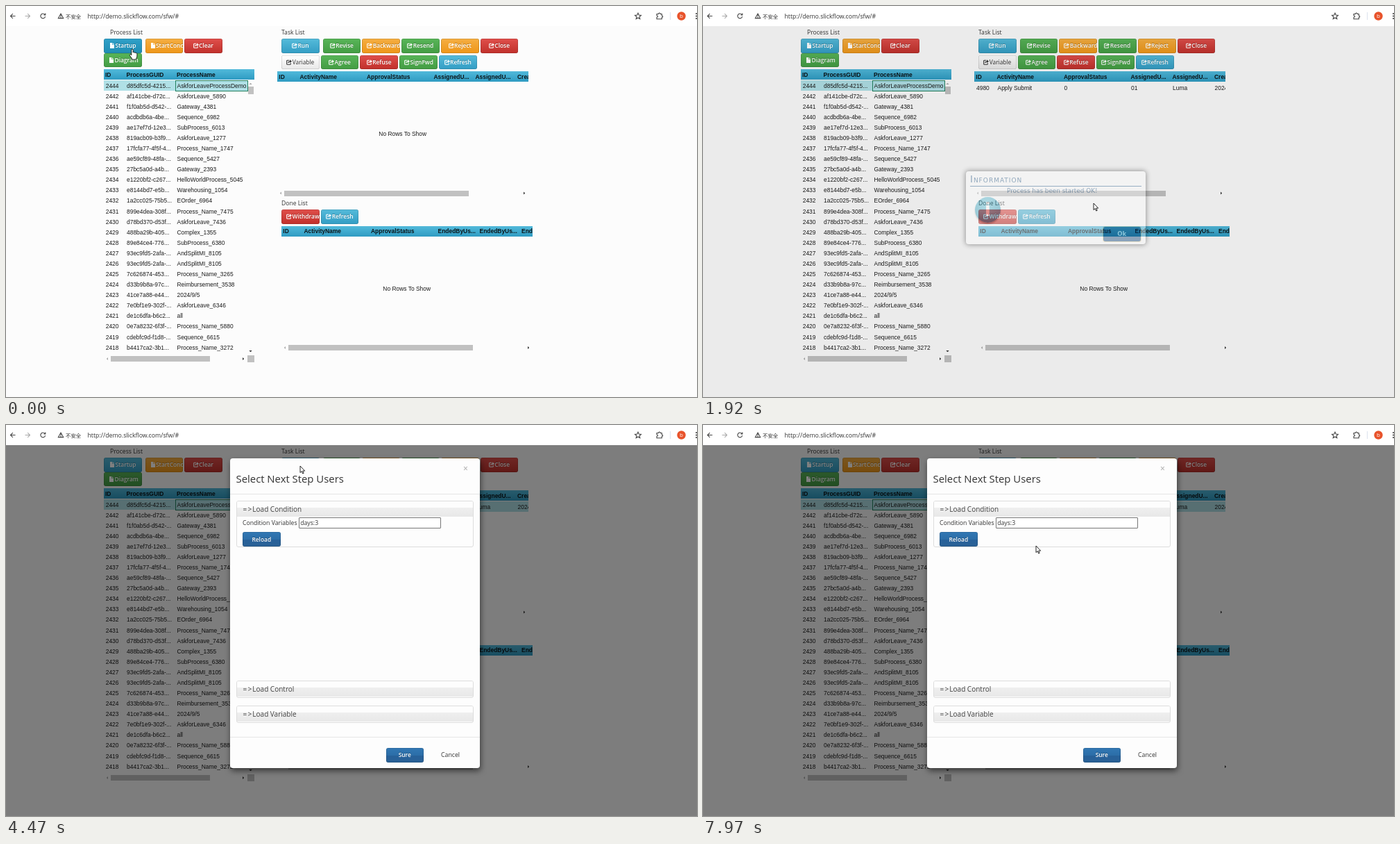
An HTML page that plays this animation: 996x563 px, repeating every 8000 ms.

```html
<!DOCTYPE html>
<html lang="en">
<head>
<meta charset="utf-8">
<title>Process demo</title>
<style>
html, body { margin: 0; width: 100%; height: 100%; overflow: hidden; background: #fcfcfc; }
#stage { position: absolute; left: 0; top: 0; width: 996px; height: 563px; overflow: hidden; background: #fcfcfc; }
#stage div { position: absolute; box-sizing: border-box; }
#stage svg { position: absolute; overflow: visible; }
.t { line-height: 12px; white-space: pre; font: 8.45px/12px "Liberation Sans", Arial, sans-serif; color: #1c1c1c; }
.ui { font: 8.65px/12px "Open Sans", sans-serif; color: #333; }
.bar { background: #fff; }
.head { background: linear-gradient(#52b9da, #41acd0 45%, #2f9bc2); overflow: hidden; }
.head .t { font-weight: bold; color: #0b1418; }
.row { overflow: hidden; }
.sel { background: #b0e0e6; }
.focus { border: 1px solid #22805e; }
.thumb { background: #c1c1c1; }
.tint { background: rgba(0, 0, 0, .03); visibility: hidden; }
.stripe { background: rgba(255, 255, 255, .3); visibility: hidden; }
.pill { background: #fff; border-radius: 4px; opacity: .6; visibility: hidden; }
.lit .tint, .lit .stripe, .lit .pill { visibility: visible; }
.btn { display: flex; align-items: center; justify-content: safe center; padding: 0 7px; overflow: hidden;
  border-radius: 3px; color: #fff; font: 600 8.4px/20px "Open Sans", sans-serif; white-space: pre;
  box-shadow: inset 0 0 0 .6px rgba(0, 0, 0, .2); text-shadow: 0 -.6px 0 rgba(0, 0, 0, .25); }
#stage .btn svg { position: static; flex: none; width: 8px; height: 8px; margin-right: .5px; }
.info { background: linear-gradient(#55bbda, #339dc4); }
.info.hover { background: linear-gradient(#2fa0c8, #1f8db4); }
.ok { background: linear-gradient(#58b558, #439c43); }
.warn { background: linear-gradient(#f5ae42, #ee9618); }
.bad { background: linear-gradient(#e04f4b, #c0302b); }
.plain { background: linear-gradient(#fff, #e8e8e8); color: #333; font-weight: 400; text-shadow: none; }
.main { background: linear-gradient(#3278b4, #2c6ea8 50%, #27619a 51%, #2a6196); }
#backdrop, #veil { left: 0; top: 29px; width: 996px; height: 534px; background: #000; }
#backdrop { opacity: .5; }
#modal { left: 322.5px; top: 48px; width: 360px; height: 446px; background: #fdfdfd; border-radius: 4px;
  box-shadow: 1px 4px 8px rgba(0, 0, 0, .55); }
.rule { background: #e6e6e6; }
.panel { border: 1px solid #ddd; border-radius: 3px; overflow: hidden; }
.cap { background: linear-gradient(#fdfdfd 9px, #efefef 9px, #e8e8e8); }
.field { border: 1px solid #777; background: #fff; border-radius: 1px; }
#msg { left: 379px; width: 259px; height: 105px; background: #fff; border-radius: 4px; box-shadow: 0 0 7px 1px #222; }
.title { font: small-caps 13.2px/16px "DejaVu Sans", sans-serif; letter-spacing: 1px; color: #0a4478; }
.line { background: #1c5488; }
.text { font: 8.85px/12px "DejaVu Sans", sans-serif; color: #1b4f80; white-space: pre; }
.badge { border-radius: 50%; color: #fff; text-align: center; font: bold 27px/36px "DejaVu Sans", sans-serif;
  background: radial-gradient(circle at 45% 25%, #5cc6dc, #138cb0 75%); box-shadow: 0 2px 2px rgba(0, 0, 0, .35); }
.alert .badge { background: radial-gradient(circle at 45% 25%, #ffc043, #f08c08 75%); }
.go { background: #013d74; border-radius: 3px; color: #fff; text-align: center; font: bold 8.6px/21px "DejaVu Sans", sans-serif;
  box-shadow: 0 0 0 1px rgba(230, 190, 90, .6); }
.alert .go { box-shadow: 0 0 1px #234; }
</style>
</head>
<body>
<div id="stage">
  <div id="page"></div>
  <div id="backdrop"></div>
  <div id="veil"></div>
  <div id="modal"></div>
  <div id="msg"></div>
  <svg id="cursor" width="1" height="1"><path stroke="#111" stroke-width=".9" stroke-linejoin="round"/></svg>
</div>
<script>
const $ = id => document.getElementById(id);
const page = $("page"), modal = $("modal"), msg = $("msg"), cursor = $("cursor");

function box(parent, cls, x, y, w, h, html = "") {
  const e = document.createElement("div");
  e.className = cls;
  e.style.cssText = `left:${x}px;top:${y}px;` + (w ? `width:${w}px;height:${h}px` : "");
  e.innerHTML = html;
  parent.append(e);
  return e;
}
// Text placed by its left edge and the middle of its line
const label = (parent, x, mid, text, cls = "t", size = 0) => {
  const e = box(parent, cls, x, mid - 6, 0, 0, text);
  if (size) e.style.fontSize = size + "px";
  return e;
};
const ui = (parent, x, mid, text, size) => label(parent, x, mid, text, "t ui", size);
const svg = (parent, content) => parent.insertAdjacentHTML("beforeend",
  `<svg width="996" height="563" style="left:0;top:0" fill="none">${content}</svg>`);

const fileIcon = `<svg viewBox="0 0 8 8" fill="currentColor"><path d="M1 0h3v2.8h3V8H1zM4.7 0L7 2.2H4.7z"/></svg>`;
const shareIcon = `<svg viewBox="0 0 8 8" fill="none" stroke="currentColor" stroke-width="1.1">
  <path d="M4 1.2H1.6Q.7 1.2.7 2.1V6.4Q.7 7.3 1.6 7.3H5.4Q6.3 7.3 6.3 6.4V5.2M2.9 5Q2.9 2.7 5.4 2.7"/>
  <path d="M5 .3L8 2.7L5 5z" fill="currentColor" stroke="none"/></svg>`;
const button = (x, y, kind, text, icon = shareIcon) => box(page, "btn " + kind, x, y, 54.5, 20.5, icon + text);

// Browser bar
box(page, "bar", 0, 0, 996, 29);
ui(page, 86, 14.5, "不安全", 7.4).style.fontFamily = '"Noto Sans CJK SC", "Noto Sans CJK", sans-serif';
ui(page, 117.5, 14.5, "http://demo.slickflow.com/sfw/#", 8.75);
svg(page, `<g stroke="#444" stroke-width="1.1">
  <path d="M13.5 14.5H6.6M9.8 11.2L6.5 14.5L9.8 17.8"/>
  <path stroke="#aaa" d="M27.5 14.5H34.4M31.2 11.2L34.5 14.5L31.2 17.8"/>
  <path d="M56 12.4A3.4 3.4 0 1 0 56.6 15.2M56.8 10.6V13H54.4"/>
  <path d="M79 11L82.7 17.6H75.3ZM79 13.3V15.4M79 16V16.9"/>
  <path d="M911 10.2L912.3 13.1L915.4 13.4L913.1 15.5L913.8 18.6L911 17L908.2 18.6L908.9 15.5L906.6 13.4L909.7 13.1Z"/>
  <path d="M938 11.5H940.5Q940.5 10 941.8 10T943 11.5H945.3V14Q946.7 14 946.7 15.2T945.3 16.4V18.7H938V16.3Q939.5 16.2 939.5 15T938 13.8Z"/>
  <path stroke="#dde3ee" d="M957.5 9V20"/></g>
  <circle cx="973.5" cy="14.5" r="6.2" fill="#e8532b"/>
  <g fill="#333"><circle cx="995" cy="11" r="1"/><circle cx="995" cy="14.5" r="1"/><circle cx="995" cy="18" r="1"/></g>`);
ui(page, 971, 14.3, "b", 8).style.color = "#fff";

// Buttons
ui(page, 150, 38, "Process List");
ui(page, 397, 38, "Task List");
ui(page, 397, 284, "Done List");
const startup = button(141, 47, "info", "Startup", fileIcon);
button(200.5, 47, "warn", "StartCond", fileIcon);
button(257, 47, "bad", "Clear");
button(141, 67.5, "ok", "Diagram", fileIcon);
const run = button(397, 47, "info", "Run");
button(456.5, 47, "ok", "Revise");
button(513.3, 47, "warn", "Backward");
button(570, 47, "ok", "Resend");
button(627, 47, "warn", "Reject");
button(683.7, 47, "bad", "Close");
button(397, 70.5, "plain", "Variable");
button(453.7, 70.5, "ok", "Agree");
button(510.4, 70.5, "bad", "Refuse");
button(567, 70.5, "ok", "SignFwd");
button(624, 70.5, "info", "Refresh");
button(397, 293, "bad", "Withdraw");
button(453.6, 293, "info", "Refresh");

// Grids
function cells(cls, x, y, w, xs, texts) {
  const row = box(page, cls, x, y, w, 15);
  texts.forEach((text, i) => label(row, xs[i], 7.6, text));
  return row;
}
function scrollbar(x, y, len, end) {
  box(page, "thumb", x + 5, y - 4, len, 8);
  svg(page, `<path fill="#aaa" d="M${x + 1} ${y - 2}v4l-2.2-2z"/><path fill="#333" d="M${end - 1} ${y - 2}v4l2.2-2z"/>`);
}
const names = `d85dfc5d-4215 AskforLeaveProcessDemo
af141cbe-d72c AskforLeave_5890
f1f0ab5d-d542- Gateway_4381
acdbdb6a-4be Sequence_6982
ae17ef7d-12e3 SubProcess_6013
819acb09-b3f9 AskforLeave_1277
17fcfa77-4f5f-4 Process_Name_1747
ae59cf89-48fa- Sequence_5427
27bc5a0d-a4b Gateway_2393
e1220bf2-c267 HelloWorldProcess_5045
e8144bd7-e5b Warehousing_1054
1a2cc025-75b5 EOrder_6964
899e4dea-308f Process_Name_7475
d78bd370-d53f AskforLeave_7436
488ba29b-405 Complex_1355
89e84ce4-776 SubProcess_6380
93ec9fd5-2afa- AndSplitMI_8105
93ec9fd5-2afa- AndSplitMI_8105
7c626874-453 Process_Name_3265
d33b9b8a-97c Reimbursement_3538
41ce7a88-e44 2024/9/5
7e0bf1e9-302f- AskforLeave_6346
de1c6dfa-b6c2 all
0e7a8232-6f3f- Process_Name_5880
cdebfc9d-f1d8- Sequence_6615
b4417ca2-3b1 Process_Name_3272`.split("\n");

box(page, "tint", 141, 106, 217, 407);
cells("head", 141, 91, 217, [2, 32.5, 105], ["ID", "ProcessGUID", "ProcessName"]);
names.forEach((line, i) => {
  const [guid, name] = line.split(" ");
  const cls = i ? (i % 2 ? "row stripe" : "row") : "row sel";
  const y = 107 + i * 15.08;
  if (i % 2) box(page, "stripe", 141, y, 207, 15);
  cells(i ? "row" : cls, 141, y, 207, [2.7, 33, 105.5], [i ? 2443 - i : 2444, guid + "...", name]);
});
box(page, "focus", 243.5, 107, 105, 15.5);
box(page, "thumb", 348.5, 116, 8.5, 10.5);
box(page, "thumb", 347.5, 503, 10.5, 10);
svg(page, `<path fill="#aaa" d="M350.3 113h4.4l-2.2-2.2z"/><path fill="#333" d="M350.3 496h4.4l-2.2 2.2z"/>`);
scrollbar(146, 508, 143, 342);

const columns = [2.3, 32.5, 129, 225.5, 285.5, 346];
const heads = (a, b) => ["ID", "ActivityName", "ApprovalStatus", a, a, b];
box(page, "tint", 391, 109, 362, 166);
cells("head", 391, 94, 362, columns, heads("AssignedU...", "CreatedDate"));
const noTasks = label(page, 537.3, 184, "No Rows To Show");
const task = cells("row", 391, 110, 362, [3, 33.5, 129.5, 226, 286, 346.5],
  ["4980", "Apply Submit", "0", "01", "Luma", "2024-11-05"]);
const taskFocus = box(page, "focus", 421, 109.5, 96.5, 15.5);
scrollbar(396, 269.5, 266, 747);

box(page, "tint", 397, 332, 362, 165);
cells("head", 397, 316.7, 362, columns, heads("EndedByUs...", "EndedDate"));
box(page, "pill", 537.5, 395.5, 80, 21.5);
label(page, 543.3, 406.5, "No Rows To Show");
scrollbar(402, 492, 266, 753);

// Step dialog
ui(modal, 9, 29, "Select Next Step Users", 14.9);
ui(modal, 336.5, 15, "×", 12).style.color = "#aaa";
box(modal, "rule", 0, 51, 360, 1);
box(modal, "rule", 0, 401, 360, 1);
function panel(y, h, text) {
  const p = box(modal, "panel", 9, y, 342, h);
  box(p, "cap", 0, 0, 340, 22);
  const t = ui(p, 9, 11.3, "<span style='letter-spacing:1.2px'>=></span>" + text, 10);
  t.style.color = "#444";
}
panel(61, 66.5, "Load Condition");
panel(320, 24.5, "Load Control");
panel(356, 24.5, "Load Variable");
ui(modal, 18.5, 93, "Condition Variables", 8.7);
box(modal, "field", 99, 84.5, 205.5, 16);
ui(modal, 101.7, 92.5, "days:3", 8.7);
box(modal, "btn main", 18.5, 106, 54.5, 21, "Reload");
box(modal, "btn main", 225, 416.5, 54.5, 21, "Sure");
ui(modal, 304.5, 427, "Cancel", 8.75);

// Message box
const title = box(msg, "title", 6, 4);
box(msg, "line", 6, 21, 247, 1);
const badge = box(msg, "badge", 13, 36.5, 37, 37);
const body = box(msg, "text", 59, 22);
box(msg, "go", 198, 80, 53.5, 21, "Ok");
const warning = "None next step exist:None condition can\nbe matched on transtion to go to next\nstep, please check the condition variable\ninvolved";

const shapes = {
  arrow: "M0 0V9.6L2.2 7.6L3.7 11L5.2 10.4L3.7 7.1H6.7Z",
  hand: "M-1.2 1.2a1.2 1.2 0 0 1 2.4 0V5a1.1 1.1 0 0 1 2.1.4a1.1 1.1 0 0 1 2 .5a1 1 0 0 1 1.6.9V10q0 2-1.2 3.4V15H-.6V13.4L-3.7 9.2a1.1 1.1 0 0 1 1.7-1.3L-1.2 8.8Z",
  beam: "M-2.5-5.3H-.7L0-4.7L.7-5.3H2.5M0-4.7V4.7M-2.5 5.3H-.7L0 4.7L.7 5.3H2.5"
};

// Tracks are [tick, values...], linear between entries
const path = [[0, 182.3, 61.5], [1, 180, 61], [2, 182.3, 61.5], [3, 182.3, 61.5], [4, 186, 61.8], [9, 600, 343], [11, 600, 343],
  [14, 562.7, 283.7], [18, 450, 114], [25, 450, 114], [29, 430, 64], [32, 424.2, 58.8], [33, 423.6, 59.3],
  [36, 575, 472], [37, 575, 472], [40, 547, 302], [41, 556, 300], [43, 576.3, 286], [46, 576.3, 286],
  [47, 600, 285], [51, 600, 285], [54, 603, 344], [55, 603, 344], [59, 479.6, 174.2]];
const fade = [[3, 0], [4, .45], [7, 1], [11, 1], [14, .4], [16, 0], [36, 0], [37, .3], [40, 1], [53, 1], [58, 0]];
const dim = [[3, 0], [4, .105], [6, .12], [11, .12], [14, .067], [17, 0], [36, 0], [37, .05], [40, .12], [53, .12], [58, 0]];
const looks = [[0, "hand"], [4, "arrow"], [9, "hand"], [12, "arrow"], [29, "hand"], [33, "arrow"],
  [36, "hand"], [38, "arrow"], [42, "beam"], [52, "arrow"], [54, "hand"], [56, "arrow"]];

function at(track, k) {
  const i = track.findIndex(p => p[0] > k);
  if (i < 0) return track.at(-1).slice(1);
  if (!i) return track[0].slice(1);
  const a = track[i - 1], b = track[i], u = (k - a[0]) / (b[0] - a[0]);
  return a.slice(1).map((v, j) => v + (b[j + 1] - v) * u);
}
const show = (e, on) => e.style.visibility = on ? "visible" : "hidden";

function draw(k) {
  const [x, y] = at(path, k), [alpha] = at(fade, k);
  const look = looks.findLast(p => p[0] <= k)[1];
  cursor.style.left = x + "px";
  cursor.style.top = y + "px";
  cursor.firstChild.setAttribute("d", shapes[look]);
  cursor.firstChild.setAttribute("fill", look === "beam" ? "none" : "#fff");

  startup.classList.toggle("hover", k < 4);
  run.classList.toggle("hover", k >= 29 && k < 33);
  page.classList.toggle("lit", k >= 4 && k < 11);
  show(noTasks, k < 4);
  show(task, k >= 4);
  task.classList.toggle("sel", k >= 19);
  show(taskFocus, k >= 19);
  show($("backdrop"), k >= 33);
  show(modal, k >= 33);

  $("veil").style.opacity = at(dim, k)[0];
  const alert = k > 30;
  msg.className = alert ? "alert" : "";
  msg.style.opacity = alpha;
  msg.style.top = 257 - (1 - alpha) * 31 + "px";
  title.textContent = alert ? "Warning" : "Information";
  badge.textContent = alert ? "!" : "i";
  body.textContent = alert ? warning : "Process has been started OK!";
}

let start, last;
function frame(now) {
  start ??= now;
  const k = Math.floor(((now - start) % 8000 + 6) / 135.1);
  if (k !== last) draw(last = k);
  requestAnimationFrame(frame);
}
draw(0);
requestAnimationFrame(frame);
</script>
</body>
</html>
```
